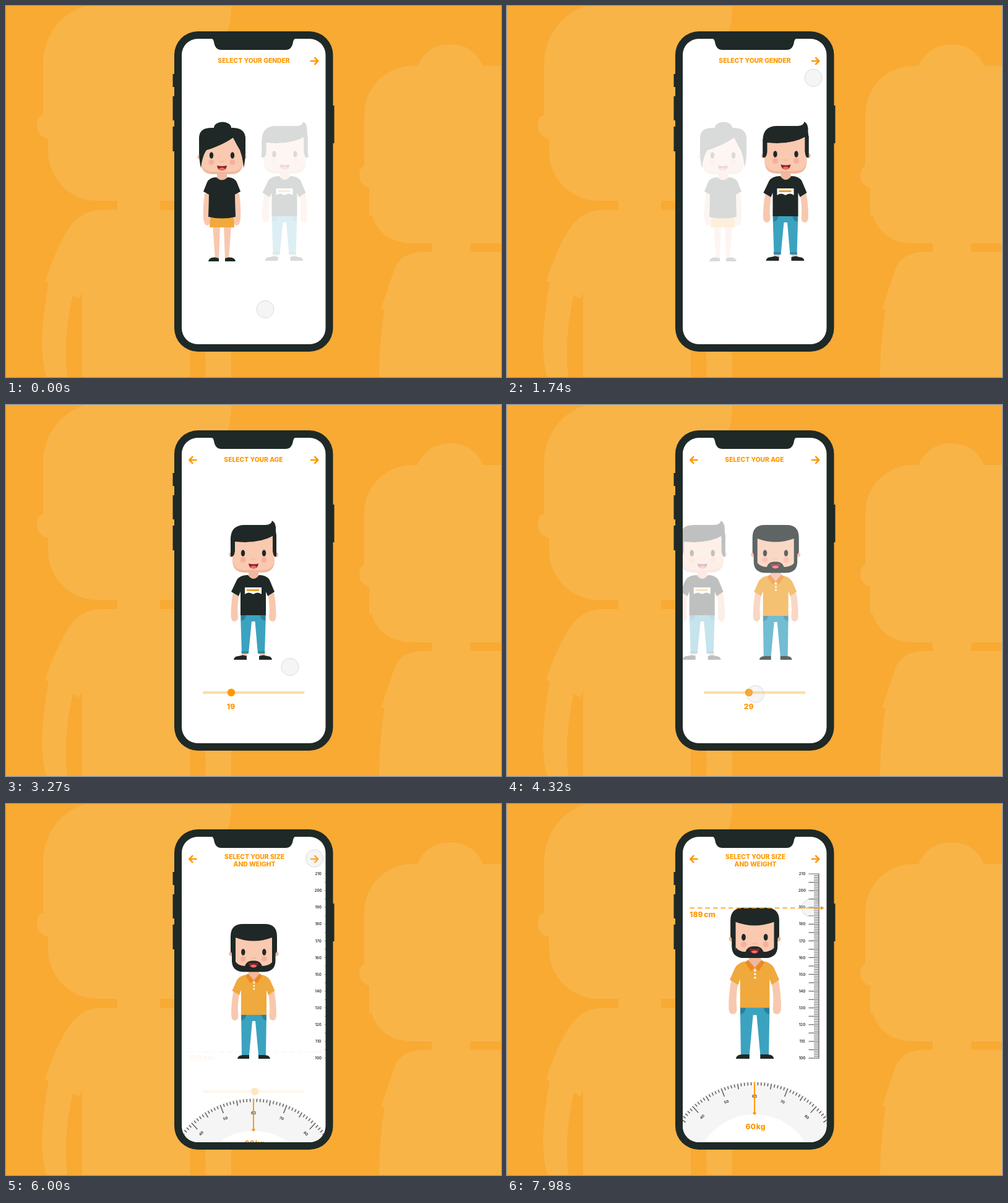
Recreate the animation shown at these times as an HTML page. Size 800 by 600 pixels, loop 8 s.

```html
<!DOCTYPE html>
<html lang="en">
<head>
<meta charset="utf-8">
<title>Profile setup</title>
<style>
html, body { margin: 0; width: 100%; height: 100%; overflow: hidden; background: #f8aa33; }
svg { display: block; width: 800px; height: 600px; }
text { font-family: Inter, "Open Sans", sans-serif; font-weight: 800; fill: #ff9800; text-anchor: middle; }
.title { font-size: 10.3px; }
.num { font-size: 12.2px; }
.mark { font-size: 6px; font-weight: 700; fill: #444; }
</style>
</head>
<body>
<svg viewBox="0 0 800 600">
  <defs>
    <clipPath id="screen"><rect x="284" y="53" width="232.500" height="494" rx="26"/></clipPath>
    <g id="arrow" fill="none" stroke="#ff9800" stroke-width="2.6" stroke-linecap="round" stroke-linejoin="round">
      <path d="M-5.500 0H5.500M.7-5.200 5.700 0 .7 5.200"/>
    </g>
    <g id="eyes" fill="#1f2826">
      <ellipse cx="-17" cy="239.500" rx="3.200" ry="5.200"/><ellipse cx="17" cy="239.500" rx="3.200" ry="5.200"/>
      <g fill="#f5b19b"><circle cx="-17" cy="250.500" r="4.500"/><circle cx="17" cy="250.500" r="4.500"/></g>
      <path d="M-4 248Q0 251.500 4 248" fill="none" stroke="#f3b59d" stroke-width="1.500"/>
    </g>
    <g id="mouth">
      <path d="M-8 256.500Q0 258.500 8 256.500Q7 264.500 0 264.500T-8 256.500Z" fill="#8f2127"/>
      <path d="M-5.500 262Q0 257.500 5.500 262Q3 264.500 0 264.500T-5.500 262Z" fill="#ee6a6c"/>
    </g>
    <g id="arms" fill="#f8c8ae">
      <path id="arm" d="M-33 303Q-36.500 320-36.500 340Q-36.500 350-31 350Q-25 350-25 342L-25.500 338Q-26.500 322-23 305Z"/>
      <use href="#arm" transform="scale(-1 1)"/>
    </g>
  </defs>

  <rect width="800" height="600" fill="#f8aa33"/>
  <g fill="#f9b448">
    <path d="M364-2Q365 24 357 45V315H249V330H364V600H322Q327 540 297 463V600H123V463L118 473 108 467Q92 535 99 600H65Q50 550 69 447L63 445Q82 390 100 362Q120 331 152 330H180V315H148A80 80 0 0 1 68 235V215Q50 210 50 193T60 177V95C60 45 92 8 135-2Z"/>
    <path d="M800 97H771Q755 62 718 62T665 97H657A78 78 0 0 0 579 175V258Q571 262 571 275T587 294V341L590 336Q605 384 660 384H688V398H670Q638 400 628 425L606 490H612Q603 545 603 600H800V398H750V384H800Z"/>
  </g>

  <g fill="#1f2927">
    <path d="M269.500 110H274V131H269.500ZM269.500 146H274V185H269.500ZM269.500 195H274V235H269.500ZM526 161H530.500V222H526Z"/>
    <rect x="272" y="41" width="256.500" height="518" rx="38"/>
  </g>
  <rect x="284" y="53" width="232.500" height="494" rx="26" fill="#fff"/>

  <g clip-path="url(#screen)">
    <g id="girl">
      <path d="M-8 268H8V281Q0 287-8 281Z" fill="#f0b99f"/>
      <path d="M-15 355H-3L-5 409H-11ZM3 355H15L11 409H5Z" fill="#f8c8ae"/>
      <path d="M-22 413Q-21 406-11 406.500L-5 408V413ZM22 413Q21 406 11 406.500L5 408V413Z" fill="#1f2826"/>
      <path d="M-28 303Q-31 325-30 343Q-29 355-24 355Q-19 355-19 347Q-24 325-20 303ZM28 303Q31 325 30 343Q29 355 24 355Q19 355 19 347Q24 325 20 303Z" fill="#f8c8ae"/>
      <path d="M-19 340H19L20 358H-20Z" fill="#f0a93c"/>
      <path d="M-9 277Q0 286 9 277Q20 277 24 285L30 300 21 305 22 341Q0 346-22 341L-21 305-30 300-24 285Q-20 277-9 277Z" fill="#1f2826"/>
      <path d="M-37 212Q-36 197-17 197H17Q36 197 38 212V240H-37Z" fill="#1f2826"/>
      <ellipse cy="197" cx="1" rx="14" ry="9.500" fill="#1f2826"/>
      <circle cx="-36" cy="244" r="3.500" fill="#f0b99f"/><circle cx="36" cy="244" r="3.500" fill="#f0b99f"/>
      <path d="M-34 235Q-12 232 18 213Q26 230 34 240V252Q34 272 14 272H-14Q-34 272-34 252Z" fill="#f0b79d"/>
      <path d="M-34 235Q-12 232 18 213Q26 230 34 240V249Q34 268 14 268H-14Q-34 268-34 249Z" fill="#f9c9b0"/>
      <path d="M-37 212L-20 228Q-31 236-34 262Q-37 250-37 235ZM38 212L18 213Q33 232 35 262Q38 250 38 235Z" fill="#1f2826"/>
      <path d="M-35 232Q-5 230 19 212L0 205-35 215Z" fill="#1f2826"/>
      <use href="#eyes" y="2"/><use href="#mouth" y="1.500"/>
    </g>

    <g id="boy">
      <use href="#arms"/>
      <path d="M-19 400H-10V407H-19ZM10 400H19V407H10Z" fill="#f8c8ae"/>
      <path d="M-32 412Q-31 406-24 406L-17 404.500-11 406V412ZM30 412Q29 406 22 406L16 404.500 9 406V412Z" fill="#1f2826"/>
      <path d="M-21 338H20L18 402H7L2.500 350H-3L-8 402H-19Z" fill="#3ba3bf"/>
      <path d="M-19.800 398H-8.200V402H-19ZM7 398H18.200L18 402H7Z" fill="#2f8aa5"/>
      <path d="M-20 340H-12Q-13 348-20 349ZM19 340H11Q12 348 19 349Z" fill="#2a7f9c"/>
      <path d="M-8 266H8V279Q0 287-8 279Z" fill="#f0b99f"/>
      <path d="M-9 275Q0 287 9 275Q21 275 26 283L34 302 23 309 20 302V340H-21V302L-24 309-36 302-27 283Q-22 275-9 275Z" fill="#1f2826"/>
      <path d="M-14 295H13V306Q7 301-.5 306Q-8 301-14 306Z" fill="#fff"/>
      <path d="M-11 298H9V301H-11Z" fill="#f0a030"/>
      <circle cx="-35.500" cy="242" r="4" fill="#f0b99f"/><circle cx="36" cy="242" r="4" fill="#f0b99f"/>
      <path d="M-37 245V217Q-37 194-14 194H19Q29 194 30 187Q37 191 36 203L37 212V245Z" fill="#1f2826"/>
      <path d="M-34 237L-30 221Q8 225 31 212V236L34 238V251Q34 271 14 271H-14Q-34 271-34 251Z" fill="#f0b79d"/>
      <path d="M-34 237H-31V221Q8 225 31 212V237H34V248Q34 267 14 267H-14Q-34 267-34 248Z" fill="#f9c9b0"/>
      <path d="M-37 215H-30V236Q-31 245-35 245H-37ZM37 210H31V236Q32 245 35 245H37Z" fill="#1f2826"/>
      <use href="#eyes"/><use href="#mouth"/>
    </g>

    <g id="man">
      <g id="body">
        <use href="#arms" x=".5"/>
        <path d="M-26 412Q-25 406-17 406L-7 405V412ZM27 412Q26 406 18 406L8 405V412Z" fill="#1f2826"/>
        <path d="M-20 339H21L20 406H8L3 351H-2L-7 406H-19Z" fill="#3ba3bf"/>
        <path d="M-19.500 341H-12Q-13 349-19.500 350ZM20.500 341H13Q14 349 20.500 350Z" fill="#2a7f9c"/>
        <path d="M-8 266H9V279L0 288-8 279Z" fill="#f0b99f"/>
        <path d="M-11 276L0 288 12 276Q22 277 27 285L34.500 302 24 309 21 301V341H-20V301L-23 309-34.500 302-27 285Q-22 277-11 276Z" fill="#f0a93c"/>
        <path d="M-9 274L.5 285 10 274 14 278 6 290 .5 285-5 290-13 278Z" fill="#ec8a22"/>
        <g fill="#fff"><circle cx=".8" cy="289" r="1.500"/><circle cx=".8" cy="294" r="1.500"/><circle cx=".8" cy="299" r="1.500"/></g>
      </g>
      <g id="head">
        <circle cx="-35.500" cy="242" r="4" fill="#f0b99f"/><circle cx="36.500" cy="242" r="4" fill="#f0b99f"/>
        <path d="M-37 238V214Q-37 194-17 194H18Q38 194 38 214V238L35.500 242V253Q35.500 271.500 16 271.500H-15Q-35 271.500-35 253V242Z" fill="#1f2826"/>
        <path d="M-29 216Q0 227 30 216V262Q20 264 13 262H-12Q-20 264-29 259Z" fill="#f9c9b0"/>
        <use href="#eyes" x=".3"/>
        <path d="M-29 255Q-24 262-14 262Q-11 254-3 253.500H3Q11 254 14 262Q25 262 31 255V264H-29Z" fill="#1f2826"/>
        <use href="#mouth"/>
      </g>
    </g>

    <g id="slider">
      <rect x="318" y="463" width="164.500" height="4.200" rx="2" fill="#ffdca6"/>
      <circle id="thumb" cy="465" r="6.200" fill="#ff9800"/>
      <text id="age" class="num" y="492.300"></text>
    </g>

    <g id="dial">
      <circle cx="400" cy="598" r="149" fill="#f5f5f5"/>
      <circle cx="400" cy="598" r="96" fill="#fff"/>
      <g id="kilos" stroke="#555"></g>
      <path d="M400 450V500" stroke="#ff9800" stroke-width="2"/>
      <path d="M400 497l3 3-3 3-3-3Z" fill="#ff9800"/>
      <text class="num" x="401.500" y="526.300">60&#8202;kg</text>
    </g>

    <g id="ruler"><g id="cms" stroke="#666"></g></g>
    <g id="level">
      <path d="M295.500 0H512" stroke="#ff9800" stroke-width="1.700" stroke-dasharray="7.500 5"/>
      <path d="M487 0H509" stroke="#ff9800" stroke-width="1.700"/>
      <path d="M508.500-3l3 3-3 3-3-3Z" fill="#ff9800"/>
      <text id="size" class="num" x="295" y="14.600" style="text-anchor:start"></text>
    </g>

    <text id="t1" class="title" x="400.500" y="92.300">SELECT YOUR GENDER</text>
    <text id="t2" class="title" x="400" y="92.300">SELECT YOUR AGE</text>
    <g id="t3"><text class="title" x="401.500" y="89.300">SELECT YOUR SIZE</text><text class="title" x="401.500" y="101.300">AND WEIGHT</text></g>
    <use href="#arrow" x="498.500" y="89"/>
    <g id="back"><use href="#arrow" transform="translate(302 89) scale(-1 1)"/></g>
    <circle id="cursor" r="14" fill="#dbdbdb" fill-opacity=".28" stroke="#bbb" stroke-opacity=".55" stroke-width=".9"/>
  </g>
  <path d="M331 52Q335 53 336 58Q338 71 348 71H452Q462 71 464 58Q465 53 469 52Z" fill="#1f2927"/>
</svg>
<script>
const LOOP = 8000;
const $ = id => document.getElementById(id);
const clamp = x => Math.max(0, Math.min(1, x));
const span = (t, start, len) => clamp((t - start) / len);
const sine = x => (1 - Math.cos(Math.PI * x)) / 2;
const glide = (t, start) => 1 - (1 - span(t, start, 750)) ** 3;
const fade = (id, a) => $(id).setAttribute('opacity', a.toFixed(3));
const place = (id, x, y = 0, k = 1) => $(id).setAttribute('transform', `translate(${x} ${y}) scale(${k})`);

// cursor moves: start, end, from, bend, to
const moves = [
  [20, 450, [419, 490.5], [465, 410], [457.5, 316]],
  [1060, 1860, [457.5, 316], [494, 200], [496, 89.5]],
  [2650, 3450, [496, 89.5], [506, 398], [434.5, 454.5]],
  [3465, 3930, [434.5, 454.5], [418, 462], [401.5, 467.5]],
  [4620, 5490, [401.5, 467.5], [532, 216], [498.5, 88]],
  [6735, 7410, [498.5, 88], [441, 120], [490, 168]]
];

function cursorAt(t) {
  const m = moves.filter(v => t >= v[0]).pop() || moves[0];
  const x = span(t, m[0], m[1] - m[0]);
  const s = .7 * x + .3 * sine(x);
  return [0, 1].map(i => m[2][i] * (1 - s) ** 2 + 2 * s * (1 - s) * m[3][i] + m[4][i] * s * s);
}

function buildScales() {
  let dial = '', ruler = '<path d="M504 112.500V411.500" stroke-width="1.300"/>';
  for (let kg = 30; kg <= 90; kg++) {
    const len = kg % 10 == 0 ? 14 : kg % 5 == 0 ? 9 : 5;
    dial += `<g transform="rotate(${(kg - 60) * 2.13} 400 598)"><path d="M400 450v${len}" stroke-width="1.400"/>` +
      (kg % 10 ? '' : `<text class="mark" stroke="none" x="400" y="475.200">${kg}</text>`) + '</g>';
  }
  for (let cm = 100; cm <= 210; cm++) {
    const y = 411 - (cm - 100) * 2.709;
    ruler += `<path d="M${cm % 5 ? 496 : 487.5} ${y}H504" stroke-width="${cm % 5 ? 1 : 1.2}"/>`;
    if (cm % 10 == 0) ruler += `<text class="mark" stroke="none" x="477" y="${y + 2.2}">${cm}</text>`;
  }
  $('kilos').innerHTML = dial;
  $('cms').innerHTML = ruler;
}

function draw(t) {
  const x = span(t, 600, 300);
  const pick = x < .5 ? 2 * x * x : 1 - 2 * (1 - x) ** 2;
  const age = glide(t, 1905), older = glide(t, 4065), size = glide(t, 5715), grow = glide(t, 7545);

  place('girl', 349 - 121 * age);
  fade('girl', 1 - .83 * pick);
  place('boy', 450.5 - 50.5 * age - 118 * older);
  fade('boy', (.17 + .83 * pick) * (1 - older));
  place('man', 400 + 118 * (1 - older));
  fade('man', older);
  const k = 1 + .173 * grow, h = 1 + .055 * grow;
  place('body', 0, 412 * (1 - k), k);
  place('head', 0, 412 - 139.3 * k - 272.7 * h, h);

  const knob = 364 + 38 * older;
  place('slider', 0, 105 * (1 - age));
  fade('slider', 1 - size);
  $('thumb').setAttribute('cx', knob);
  $('age').setAttribute('x', knob - .5);
  $('age').textContent = Math.round(19 + 14 * older);
  fade('age', age ** 3);

  place('dial', 0, 113 * (1 - size));
  place('ruler', 117 * (1 - size));
  const rise = span(t, 5970, 450), up = sine(rise);
  place('level', 0, 403 - 209 * up - 27.8 * grow);
  fade('level', rise);
  $('size').textContent = Math.floor(100 + 80 * up + 10.1 * grow) + '\u2009cm';

  const toAge = span(t, 1905, 200), toSize = span(t, 5715, 200);
  fade('t1', 1 - toAge);
  fade('t2', toAge * (1 - toSize));
  fade('t3', toSize);
  fade('back', toAge);
  place('cursor', ...cursorAt(t));
}

buildScales();
draw(0);
const begin = performance.now();
(function tick() {
  draw((performance.now() - begin) % LOOP);
  requestAnimationFrame(tick);
})();
</script>
</body>
</html>
```
